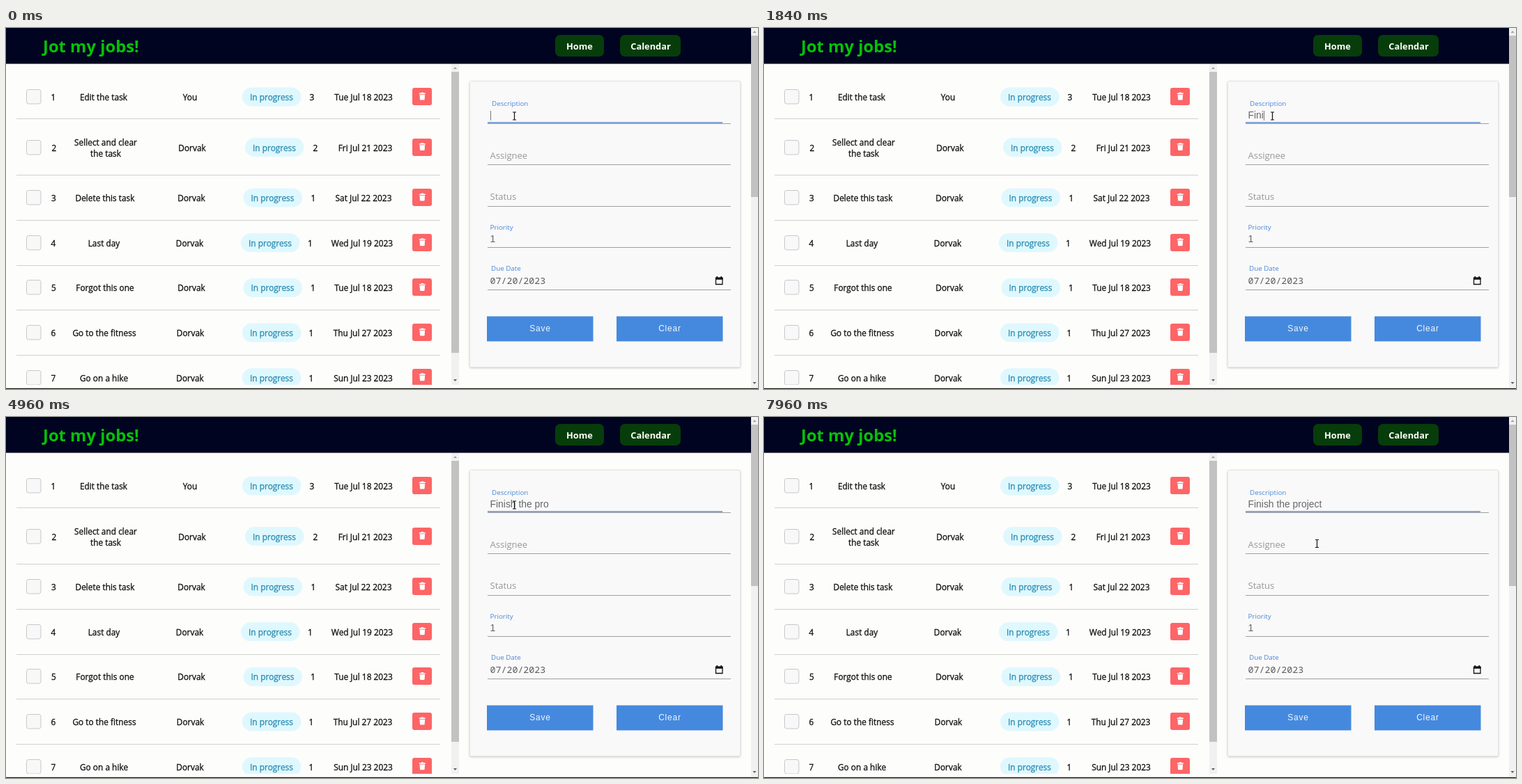
Write an HTML page that moves like this. It is 1079 by 519 pixels and loops after 8000 ms.

```html
<!DOCTYPE html>
<html lang="en">
<head>
<meta charset="utf-8">
<title>Task list</title>
<style>
  html, body { margin: 0; width: 100%; height: 100%; overflow: hidden; background: #fdfdfc; }
  svg { display: block; width: 1079px; height: 519px; }
  text { font-family: "Open Sans", "Noto Sans", sans-serif; white-space: pre; }
  .row { font-size: 11.9px; fill: #111; stroke: #111; stroke-width: .3px; text-anchor: middle; }
  .status { fill: #2b8cb3; stroke: #2b8cb3; }
  .brand { font-size: 23.8px; font-weight: 700; fill: #06c206; }
  .nav { font-size: 12.8px; font-weight: 700; fill: #fff; text-anchor: middle; }
  .label { font-size: 9.8px; fill: #4a86d8; }
  .hint { font-size: 13px; fill: #979797; }
  .value { font: 13.9px "Liberation Sans", Arial, sans-serif; fill: #666; }
  .date { font: 13.3px "Noto Sans Mono", monospace; fill: #5c5c5c; }
  .button { font: 12px "Liberation Sans", Arial, sans-serif; letter-spacing: .8px; fill: #f4f8fd; text-anchor: middle; }
  .card { filter: drop-shadow(0 1px 1.5px rgba(0, 0, 0, .2)); }
</style>
</head>
<body>
<svg id="stage" viewBox="0 0 1079 519">
  <defs>
    <clipPath id="listClip"><path d="M0 52H639V513H0z"/></clipPath>
    <g id="bin" fill="#fff">
      <path d="M-4.5 -5H-2L-1.4 -6H1.4L2 -5H4.5V-3.6H-4.5z"/>
      <path d="M-3.8 -2.8H3.8L3.3 4.2Q3.2 5 2.4 5H-2.4Q-3.2 5 -3.3 4.2z"/>
    </g>
  </defs>
</svg>
<script>
const NS = "http://www.w3.org/2000/svg";
const stage = document.getElementById("stage");

function add(parent, tag, attrs, content) {
  const el = document.createElementNS(NS, tag);
  for (const key in attrs) el.setAttribute(key, attrs[key]);
  if (content !== undefined) el.textContent = content;
  parent.appendChild(el);
  return el;
}
const box = (parent, x, y, width, height, fill, rx = 0, more = {}) =>
  add(parent, "rect", { x, y, width, height, fill, rx, ...more });
const text = (parent, cls, x, y, content) =>
  add(parent, "text", { class: cls, x, y }, content);
const path = (d, fill, more = {}) => add(stage, "path", { d, fill, ...more });

function scrollbar(x, w, top, bottom, thumbTop, thumbEnd) {
  const c = x + w / 2;
  box(stage, x, top, w, bottom - top, "#f1f1f1");
  box(stage, x, thumbTop, w, thumbEnd - thumbTop, "#c2c2c2");
  path(`M${c - 2.5} ${top + 7}h5l-2.5 -3z`, "#a0a0a0");
  path(`M${c - 2.5} ${bottom - 8}h5l-2.5 3z`, "#606060");
}

// Header
box(stage, 0, 0, 1079, 519, "#fdfdfc");
box(stage, 0, 0, 1069, 51.5, "#000420");
text(stage, "brand", 53, 35, "Jot my jobs!");
box(stage, 788, 10, 70, 31, "#073d0a", 7);
text(stage, "nav", 823, 30.7, "Home");
box(stage, 881, 10, 87, 31, "#073d0a", 7);
text(stage, "nav", 925, 30.7, "Calendar");

// Task rows: centre, number x, lines, task x, person, person x, pill x, priority, its x, date, its x, rule y
const mate = "Dorvak";
const tasks = [
  [99, 68, ["Edit the task"], 140, "You", 264, 339, 3, 439, "Tue Jul 18 2023", 513, 130.5],
  [171.5, 69, ["Sellect and clear", "the task"], 143, mate, 267, 343, 2, 444, "Fri Jul 21 2023", 515.5, 211.5],
  [244, 68.5, ["Delete this task"], 142, mate, 266, 340.5, 1, 441, "Sat Jul 22 2023", 513, 276.5],
  [308.8, 68, ["Last day"], 140.5, mate, 263.5, 337, 1, 436.5, "Wed Jul 19 2023", 511, 341.5],
  [373.4, 68.5, ["Forgot this one"], 142, mate, 266, 340.5, 1, 440.5, "Tue Jul 18 2023", 513, 405.5],
  [438, 68, ["Go to the fitness"], 141, mate, 264.5, 339, 1, 438, "Thu Jul 27 2023", 512, 470.5],
  [502.8, 68, ["Go on a hike"], 140.5, mate, 264, 339, 1, 438, "Sun Jul 23 2023", 512.5, 535]
];
const list = add(stage, "g", { "clip-path": "url(#listClip)" });
tasks.forEach(([y, numX, lines, taskX, who, whoX, pillX, prio, prioX, date, dateX, rule], i) => {
  const base = y + 5;
  box(list, 29.5, Math.round(y) - 10.5, 20.5, 20.5, "#f8f8f8", 3, { stroke: "#c8c8ca" });
  text(list, "row", numX, base, i + 1);
  lines.forEach((line, n) =>
    text(list, "row", taskX, base + (n - (lines.length - 1) / 2) * 16, line));
  text(list, "row", whoX, base, who);
  box(list, pillX, y - 13.5, 84.5, 27, "#dff8fe", 13.5);
  text(list, "row status", pillX + 42, base, "In progress");
  text(list, "row", prioX, base, prio);
  text(list, "row", dateX, base, date);
  box(list, 583, Math.round(y) - 13, 28, 25, "#fd6567", 3);
  add(list, "use", { href: "#bin", x: 597.3, y: y - 0.5 });
  box(list, 15, rule - 0.5, 608, 1, "#d0d0cc");
});
scrollbar(639, 11, 52, 513, 63, 467);
scrollbar(1069, 10, 0, 517, 11, 243);

// Form
box(stage, 665.5, 76.5, 388, 411, "#f9f9f9", 2, { class: "card", stroke: "#e4e4e4" });
[137, 196, 256, 315, 376].forEach(y => box(stage, 691, y, 349, 1, "#a0a0a0"));
box(stage, 691, 135, 337, 2, "#86a6d8");
text(stage, "label", 697, 112, "Description");
text(stage, "hint", 694.5, 188, "Assignee");
text(stage, "hint", 694.5, 247, "Status");
text(stage, "label", 694.5, 289.5, "Priority");
text(stage, "value", 694.5, 308, "1");
text(stage, "label", 696, 349, "Due Date");
text(stage, "date", 694.5, 368, "07/20/2023");
path("M1018.5 359.5h9.5v9h-9.5z", "none", { stroke: "#111", "stroke-width": 1.3 });
path("M1018 358.5h10.5v3.2h-10.5zM1019.5 357h1.6v2h-1.6zM1025.4 357h1.6v2h-1.6z", "#111");
[[690, "Save", 766.5], [876, "Clear", 952.5]].forEach(([x, name, cx]) => {
  box(stage, x, 414.5, 152.5, 36, "#4589de");
  text(stage, "button", cx, 435.7, name);
});

// Moving parts
const field = text(stage, "value", 694.5, 130, "");
const caret = box(stage, 0, 119, 1, 14, "#777");
const pointer = path("M-2.5 -5.5H-.6L0 -5L.6 -5.5H2.5M0 -5V5M-2.5 5.5H-.6L0 5L.6 5.5H2.5", "none",
  { stroke: "#111", "stroke-width": 1.2 });
box(stage, 0, 517, 1079, 1, "#d9d9d6");
box(stage, 0, 518, 1079, 1, "#16160f");

const LOOP = 8000;
const phrase = "Finish the project";
const keys = [1200, 1400, 1600, 1800, 2000, 2280, 2560, 2760, 2960, 3160, 3440, 3840,
  4160, 4400, 5160, 5440, 5720, 6000];
const pen = document.createElement("canvas").getContext("2d");
pen.font = '13.9px "Liberation Sans", Arial, sans-serif';
const ease = p => p * p * (3 - 2 * p);

function draw(t) {
  const count = keys.filter(k => k <= t).length;
  const typed = phrase.slice(0, count);
  field.textContent = typed;
  const since = count ? t - keys[count - 1] : t + 190;
  caret.setAttribute("x", 695 + Math.round(pen.measureText(typed).width - 0.5 * (count > 0)));
  caret.setAttribute("visibility", since % 1000 < 500 ? "visible" : "hidden");
  const p = ease(Math.min(1, Math.max(0, (t - 7160) / 640)));
  pointer.setAttribute("transform", `translate(${729.5 + 64 * p} ${126.5 + 55.5 * p})`);
}

const start = performance.now();
function tick(now) {
  draw(Math.max(0, now - start) % LOOP);
  requestAnimationFrame(tick);
}
draw(0);
requestAnimationFrame(tick);
</script>
</body>
</html>
```
